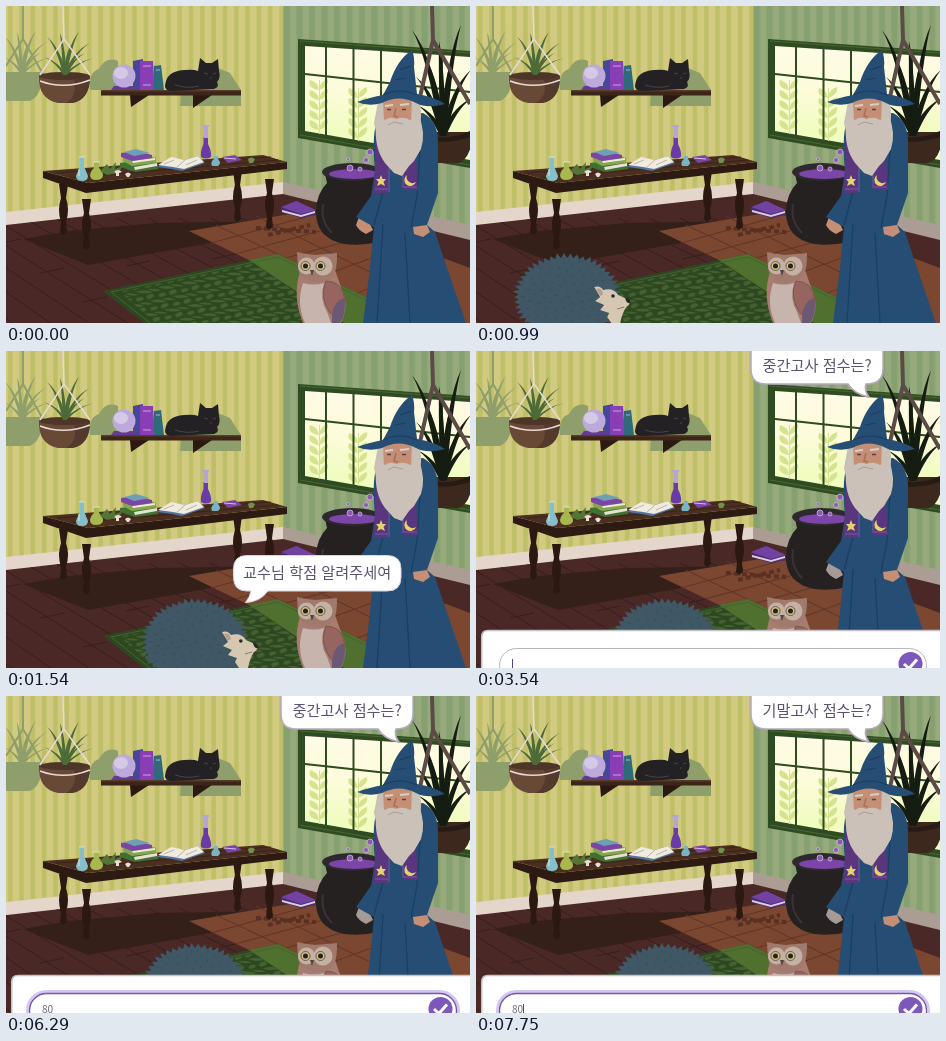
An HTML page for the animation above (8 s loop, 464 px wide and 317 px high).

```html
<!DOCTYPE html>
<html lang="ko">
<head>
<meta charset="utf-8">
<style>
  html, body { margin: 0; width: 100%; height: 100%; overflow: hidden; background: #4a2825; }
  svg { display: block; width: 464px; height: 317px; }
  text { font: 300 15.2px "Noto Sans CJK KR", "Noto Sans CJK", "Noto Sans", sans-serif; fill: #5c5270; }
  #typed { font-size: 10px; fill: #6c6877; }
</style>
</head>
<body>
<svg viewBox="0 0 464 317" fill="none">
  <defs>
    <pattern id="stripeL" width="11.300" height="9" patternUnits="userSpaceOnUse">
      <path fill="#d1ca80" d="M0 0H12V9H0z"/><path fill="#bfbf68" d="M2 0H6.500V9H2z"/>
    </pattern>
    <pattern id="stripeR" width="12.500" height="9" patternUnits="userSpaceOnUse" x="277">
      <path fill="#96aa7b" d="M0 0H13V9H0z"/><path fill="#87a072" d="M1 0H7V9H1z"/>
    </pattern>
    <pattern id="weave" width="15" height="13" patternUnits="userSpaceOnUse" patternTransform="matrix(1.500 -.3 1.100 .7 97 285)">
      <path fill="#456130" d="M1 6Q3 0 8 1Q8 5 1 6ZM1 8Q8 7 9 12Q3 13 1 8ZM9 6Q10 1 15 2Q15 6 9 6ZM9 8Q14 8 15 12Q10 12 9 8Z"/>
    </pattern>
    <linearGradient id="sky" x2="0" y2="1"><stop stop-color="#fffbe6"/><stop offset=".4" stop-color="#fdfbda"/><stop offset=".75" stop-color="#f0fcc0"/></linearGradient>
    <clipPath id="floorClip"><path d="M0 219L277 188L464 234V317H0Z"/></clipPath>
  </defs>

  <!-- walls and floor -->
  <path fill="url(#stripeL)" d="M0 0H277V190L0 220z"/>
  <path fill="url(#stripeR)" d="M277 0H464V235L277 189z"/>
  <path fill="#e5d6cb" d="M0 206L277 176V189L0 220Z"/>
  <path fill="#ab9d94" d="M277 176L464 219V236L277 189Z"/>
  <path fill="#4a2825" d="M0 219L277 188L464 234V317H0Z"/>
  <g clip-path="url(#floorClip)">
    <g id="planks" stroke="#391d1c"/>
    <path fill="#352019" d="M17 233L62 225L150 217L268 215L205 237L82 259Z"/>
    <path fill="#7c4731" d="M183 225L290 207L330 212L464 262V317H372L275 249L245 255Z"/>
    <path stroke="#5f3426" d="M205 237L300 211M229 248L325 222M280 252L350 233M313 271L385 245M345 290L410 262M210 219L280 252M250 210L372 270"/>
    <path stroke="#5a3022" stroke-width="4" stroke-dasharray="5 3" d="M250 222L310 226M262 229L304 219"/>
  </g>
  <path fill="#2d4820" d="M97 285L272 248L378 300V317H138Z"/>
  <path fill="#50702f" d="M243 254L272 248L378 300V317H338Z"/>
  <path fill="url(#weave)" d="M114 286L250 257L330 317H150Z"/>
  <path stroke="#456330" d="M105 286L272 251L372 300M105 286L144 317"/>

  <!-- wall shadows -->
  <g fill="#8f9f6c">
    <path d="M0 66H37Q36 90 24 95H0ZM84 84Q82 66 93 63Q100 50 112 55L113 84ZM175 84Q181 69 187 72L207 60L224 67L235 84V100H174Z"/>
    <g id="shadePlant"/>
  </g>
  <path stroke="#8f9f6c" stroke-width="2" d="M17 0V33L0 60M17 33L37 68"/>

  <!-- left hanging plant -->
  <path fill="#684936" d="M33 70Q32 93 52 97H66Q84 94 84 70Z"/>
  <ellipse cx="58.500" cy="70" rx="25.500" ry="4" fill="#4d3528"/>
  <path fill="#533a2c" d="M68 74Q72 90 60 97H66Q84 94 84 70Z"/>
  <g id="plantL" fill="#4c6b38"/>
  <path stroke="#e9d9d5" stroke-width="1.500" d="M57 0L58 33L34 69M58 33L84 69M34 75Q58 84 84 74"/>

  <!-- shelf -->
  <path fill="#2b1912" d="M124 89H143L125 101ZM187 89H206L187 102Z"/>
  <path fill="#3c2519" d="M95 85H235V89.500H95Z"/>
  <path fill="#5a3b27" d="M95 84H235V85.500H95Z"/>
  <path fill="#46479a" d="M127 55L137 53V84H127Z"/>
  <path fill="#8a3eb6" d="M134 55H147L149 84H134Z"/>
  <path fill="#2f6a78" d="M148 60L155 59L158 84H148Z"/>
  <path stroke="#c9a3dd" d="M137 60H145M137 79H145M150 64H154"/>
  <path fill="#633b91" d="M108 80H128L131 84H105Z"/>
  <circle cx="118" cy="70" r="11.500" fill="#bda9dc"/>
  <ellipse cx="115" cy="67" rx="7" ry="6" fill="#d5cae6"/>
  <path fill="#232124" d="M159 80Q160 65 178 64Q188 63 192 65L194 52L200 57H206L212 53L213 65Q215 72 211 76Q214 81 208 83L166 85Q159 85 159 80Z"/>
  <path stroke="#48434a" d="M169 79Q181 83 193 80M198 67L202 68M207 68L210 67M204 72H206"/>

  <!-- window -->
  <path fill="#2f4b22" d="M292 33L464 45V162L292 132Z"/>
  <path fill="url(#sky)" d="M299 40L464 51V154L299 125Z"/>
  <g id="vines" fill="#d5e28e"/>
  <path stroke="#2f4b22" stroke-width="2" d="M320 39V130M347.500 40V137M375 43V142M406 45V150M436 47V156M299 68L464 86"/>
  <path stroke="#49672f" stroke-width="1" d="M294 35L464 47M294 129L464 159"/>

  <!-- right hanging plant -->
  <path fill="#3d281d" d="M413 126Q414 153 430 157H452Q464 155 468 126Z"/>
  <path fill="#281a14" d="M413 126Q438 137 464 125V131Q438 140 413 132Z"/>
  <g id="plantR" fill="#151d12"/>
  <path stroke="#5c4a46" stroke-width="4" d="M426 0L427 34L406 126M427 34L464 98"/>

  <!-- table -->
  <g fill="#2a1811">
    <path id="leg" d="M53 178H62L60 192Q64 204 60 216L61 226L57 229L54 226L55 216Q51 204 55 192Z"/>
    <use href="#leg" x="174" y="-13"/><use href="#leg" x="206" y="-5"/><use href="#leg" x="23" y="15"/>
  </g>
  <path fill="#2d1a12" d="M37 165L82 177L281 156V163L80 187L37 172Z"/>
  <path fill="#4b2f20" d="M37 165L257 149L281 156L82 177Z"/>
  <path stroke="#3b2418" d="M50 167L265 151M64 172L272 154"/>
  <path fill="#84bfca" d="M74 151H78V160L82 170Q82 175 76 175Q70 175 70 170L74 160Z"/>
  <path fill="#a8b84f" d="M88 156H93V162Q97 165 97 170Q96 174 90 174Q84 174 84 169Q85 164 88 162Z"/>
  <path stroke="#d8e4d4" d="M73 151H79M87 156H94M73 163V170"/>
  <path fill="#557536" d="M94 165L101 158L104 163L110 156L109 163L117 160L112 167L101 169Z"/>
  <path fill="#e9dfd4" d="M108 166Q112 162 116 166L113 167V170H110V167ZM119 168Q122 165 125 168L123 171H121Z"/>
  <path fill="#3f7034" d="M114 157L141 153L152 158V163L129 166L114 161Z"/>
  <path fill="#e7e1cf" d="M128 161L151 157V160L129 164Z"/>
  <path fill="#86a64d" d="M117 151L140 148L150 152V157L126 160L117 155Z"/>
  <path fill="#efe8d9" d="M126 155L149 152V154L127 157Z"/>
  <path fill="#7b45a5" d="M115 147L131 145L146 149V152L126 155L115 151Z"/>
  <path fill="#6f9fb5" d="M118 146L130 143L144 147L128 150Z"/>
  <path fill="#5276a1" d="M151 161L166 152L179 154L192 150L199 157L176 165L166 163Z"/>
  <path fill="#f0eadf" d="M152 159L165 151L179 154L192 150L198 156L178 163L167 161Z"/>
  <path stroke="#b9b3aa" d="M158 158L168 154M180 159L191 154M171 161L179 154"/>
  <path fill="#6a3ba6" d="M197.500 131H202V138Q206 146 205 151Q200 154 195 151Q194 146 197.500 138Z"/>
  <path fill="#b6a4d4" d="M198 120H202V132H198ZM196 119H203V121H196Z"/>
  <path fill="#78b4c4" d="M208 150H212V153Q216 157 212 160H206Q204 156 208 153Z"/>
  <path fill="#7b45a5" d="M216 151L229 149L236 154L222 157Z"/><path stroke="#d6bfe2" d="M218 152L230 153"/>
  <path fill="#71904b" d="M242 153Q245 150 249 153L247 157H243Z"/>

  <!-- floor book and cauldron -->
  <path fill="#4b2b73" d="M275 202L292 195L310 206V209L295 212L275 206Z"/>
  <path fill="#d9cfdc" d="M276 204L295 209L309 205V207L295 211L276 206Z"/>
  <path fill="#7142a2" d="M275 201L290 195L310 204L295 208Z"/>
  <path fill="#252120" d="M319 168H372V236Q356 240 338 238Q309 232 310 204Q311 187 321 177Z"/>
  <path stroke="#393339" stroke-width="2" d="M317 198Q314 215 326 227"/>
  <ellipse cx="346" cy="166" rx="30" ry="9" fill="#2e292e"/>
  <ellipse cx="348" cy="168" rx="25" ry="5" fill="#7c46a8"/>
  <g fill="#8d59b5" stroke="#cbb5de" stroke-width=".8">
    <circle cx="344" cy="162" r="3"/><circle cx="360" cy="154" r="2.500"/><circle cx="342" cy="153" r="1.500"/><circle cx="364" cy="146" r="3"/><circle cx="354" cy="163" r="2"/>
  </g>

  <!-- wizard -->
  <path id="hand" d="M353 211L363 216L367 224L360 228Q352 224 350 219Z"/>
  <path fill="#264d73" d="M373 111Q365 124 369 165L365 190L350 211L368 221L363 270L357 317H460Q441 262 429 226L421 219L432 187V140Q433 115 417 107Z"/>
  <path fill="#c48f75" d="M407 221L421 219L424 226L417 231L408 228Z"/>
  <path stroke="#1b3d60" stroke-width="1.200" d="M368 219L377 186M405 222L411 190L414 144M377 218L371 317M399 227L404 317"/>
  <path fill="#5a367f" d="M370 130H383L382 187H368ZM397 137H409L412 184H398Z"/>
  <path stroke="#8057a5" d="M369 183H382M398 181H411M383 150V186M397 150V182"/>
  <path fill="#e5d36b" d="M375 169L376.500 173L380 173L377.500 176L379 180L375 178L371 180L372.500 176L370 173L373.500 173ZM401 169A6 6 0 1 0 410 176A6 6 0 0 1 401 169Z"/>
  <path fill="#c8bfb5" d="M373 90L368 117L372 134L413 125Q418 104 411 91Z"/>
  <path fill="#c48f75" d="M377 91H406L405 117H378Z"/>
  <path fill="#cbc1b8" d="M372 109L379 114Q384 110 390 113Q398 110 404 114L413 110Q420 127 415 143L408 155L403 160L396 170L388 167L379 157Q368 142 370 119Z"/>
  <path stroke="#d8cfc7" stroke-width="2" d="M379 100L387 99M394 99L403 98"/>
  <path stroke="#5b423e" stroke-width="1.500" d="M381 103.500H385M396 103.500H400"/>
  <path stroke="#a87058" stroke-width="1.500" d="M390 102L388 110L392 111"/>
  <path stroke="#a99d95" d="M382 119L388 116L397 118"/>
  <path fill="#264d73" d="M351 96Q362 92 377 89L384 76Q391 54 406 44Q409 52 408 61L411 88Q429 91 439 98Q421 103 410 97Q393 88 376 97Q363 101 351 96Z"/>
  <path stroke="#1b3d60" stroke-width="1.200" d="M377 89Q394 81 411 89M394 64L405 60M389 74L400 72"/>

  <!-- owl -->
  <path fill="#a87d70" d="M294 266Q286 290 297 317H335Q344 299 335 281L329 264Z"/>
  <path fill="#c6b4ad" d="M297 277Q308 280 318 277Q313 293 321 306L325 317H299Q290 297 297 277Z"/>
  <path fill="#96655f" stroke="#75504d" stroke-width=".8" d="M320 275Q337 275 339 295L336 310Q330 312 324 307Q313 291 320 275Z"/>
  <path fill="#6b5874" d="M338 292Q325 296 326 317H334Q341 308 338 292Z"/>
  <path fill="#a07a6d" d="M291 246Q299 248 309 249Q321 248 331 247Q331 257 330 262Q327 277 310 276Q294 275 292 262Z"/>
  <circle cx="300.500" cy="260" r="8.500" fill="#c5b0a4"/><circle cx="317" cy="260" r="9.500" fill="#c5b0a4"/>
  <g stroke="#51463b" stroke-width=".8" fill="#d0c283"><circle cx="299.500" cy="260" r="4.500"/><circle cx="314.500" cy="260" r="4.500"/></g>
  <path fill="#252025" d="M297 260A2.500 2.500 0 1 0 302 260A2.500 2.500 0 1 0 297 260ZM312 260A2.500 2.500 0 1 0 317 260A2.500 2.500 0 1 0 312 260Z"/>
  <path fill="#504744" d="M304 264H308L306 270Z"/>

  <!-- hedgehog, local x starts at its left edge -->
  <g id="hedgehog">
    <path id="spines" fill="#405865"/>
    <g id="quills" stroke="#374e5b"/>
    <path fill="#d6c7b3" d="M82 281Q88 279 91 284Q101 281 106 289L117 294Q119 298 114 301Q110 307 108 317H99L95 311L97 307L88 304L92 299L83 295L88 291Z"/>
    <path fill="#b79d8d" d="M84 283Q89 281 91 288L88 290Z"/>
    <path fill="#2b2729" d="M113 292Q119 292 118 297Q114 298 113 292ZM99 290A1.800 1.800 0 1 0 102.600 290A1.800 1.800 0 1 0 99 290Z"/>
    <path stroke="#8e7568" d="M105 303L112 301"/>
  </g>

  <g id="ask">
    <path fill="#fff" stroke="#d9d4dc" d="M241 204.500H381Q395 204.500 395 218V226Q395 240 381 240H262Q254 251 239.500 251.500Q244 246 245 240H241Q227.500 240 227.500 226V218Q227.500 204.500 241 204.500Z"/>
    <text x="237" y="227">교수님 학점 알려주세여</text>
  </g>

  <g id="quiz">
    <path fill="#fff" stroke="#b4a9bd" stroke-width="1.500" d="M275 -8V18Q275 33 290 33H372Q378 43 393 46Q388 40 390 33Q407 33 407 18V-8Z"/>
    <text id="question" x="286.500" y="20"></text>
    <path fill="#fff" stroke="#c6c0c9" stroke-width="1.500" d="M5.700 325V286Q5.700 279.500 12 279.500H472V325Z"/>
    <rect x="23.500" y="297.500" width="427" height="34" rx="17" fill="#fff" stroke="#b9b7c0"/>
    <g id="ring">
      <rect x="21.500" y="295.500" width="431" height="38" rx="19" stroke="#d3c7ef" stroke-width="3"/>
      <rect x="23.500" y="297.500" width="427" height="34" rx="17" stroke="#7657ad" stroke-width="1.300"/>
    </g>
    <circle cx="434.500" cy="313" r="12" fill="#7d58bb"/>
    <path stroke="#fff" stroke-width="3" d="M428 313L433 317.500L441 308.500"/>
    <text id="typed" x="36" y="317"></text>
    <path id="caret" stroke="#593f96" d="M.5 308V318"/>
  </g>
</svg>
<script>
const LOOP = 8000;
const $ = id => document.getElementById(id);
const clamp = v => Math.max(0, Math.min(1, v));
const path = (id, d) => $(id).insertAdjacentHTML("beforeend", `<path d="${d}"/>`);

// Tapered blades fanning out from a common root
function fan(id, x, y, tips, w) {
  for (const [dx, dy] of tips) {
    const mx = x + dx * .4, my = y + dy * .75;
    path(id, `M${x - w} ${y}Q${mx - w} ${my} ${x + dx} ${y + dy}Q${mx + w} ${my} ${x + w} ${y}Z`);
  }
}
const leaves = [[-21, -18], [-18, -38], [-11, -27], [-5, -42], [6, -30], [14, -43], [20, -22], [29, -17], [25, -32]];
fan("plantL", 59, 69, leaves, 1.7);
fan("shadePlant", 16, 68, leaves, 1.7);
fan("plantR", 437, 130, [[-31, -106], [-27, -59], [-18, -78], [-4, -95], [8, -74], [18, -111], [28, -66], [29, -38], [-26, -31]], 3);

// Leafy stems behind the glass
for (const [x, top, base] of [[313, 74, 128], [352, 82, 135]]) {
  path("vines", `M${x} ${top}H${x + 1}V${base}H${x}Z`);
  for (let y = top + 5; y < base; y += 10)
    path("vines", `M${x} ${y + 5}Q${x - 12} ${y + 3} ${x - 9} ${y - 5}Q${x - 1} ${y - 3} ${x} ${y + 5}Q${x + 11} ${y + 1} ${x + 9} ${y - 6}Q${x + 1} ${y - 4} ${x} ${y + 5}Z`);
}

for (let i = 0; i < 17; i++) path("planks", `M${i * 31 - 230} 212L${i * 39 - 100} 325`);
for (let i = 0; i < 8; i++) path("planks", `M${i * 43 - 9} ${238 + i * 29 % 65}l24 -5`);

const spike = (a, r) => [55 + Math.cos(a) * 52 * r, 291 + Math.sin(a) * 42 * r].map(v => v.toFixed(1)).join(" ");
let outline = "";
for (let i = 0; i < 100; i++) outline += (i ? "L" : "M") + spike(i * Math.PI / 50, i % 2 ? .93 : 1.02 + i * 7 % 5 * .01);
$("spines").setAttribute("d", outline + "Z");
for (let i = 0; i < 80; i++) {
  const a = i * 2.4, r = Math.sqrt(i / 80) * .86;
  path("quills", `M${spike(a, r)}L${spike(a, r + .07)}`);
}

const walk = [[500, -119], [990, 36], [1260, 91], [1540, 134]];
function walkX(t) {
  for (let i = 1; i < walk.length; i++) {
    const [t0, x0] = walk[i - 1], [t1, x1] = walk[i];
    if (t < t1) return x0 + (x1 - x0) * clamp((t - t0) / (t1 - t0));
  }
  return walk[3][1];
}

const within = (t, spans) => spans.some(([a, b]) => t >= a && t < b);
const show = (id, on) => $(id).style.display = on ? "" : "none";

function draw(now) {
  const t = now % LOOP, quiz = t >= 3540, second = t >= 6490;
  $("hedgehog").setAttribute("transform", `translate(${walkX(t).toFixed(2)})`);
  $("hand").setAttribute("fill", quiz ? "#a69a96" : "#c48f75");
  show("ask", t >= 1540 && !quiz);
  show("quiz", quiz);
  $("question").textContent = second ? "기말고사 점수는?" : "중간고사 점수는?";
  $("ring").setAttribute("opacity", clamp((t - (second ? 6490 : 3540)) / 270));
  const [one, two] = second ? [7480, 7680] : [5690, 5760];
  const count = (t >= one) + (t >= two);
  $("typed").textContent = "80".slice(0, count);
  $("caret").setAttribute("transform", `translate(${36 + count * 5.5})`);
  show("caret", within(t, [[3540, 4080], [4610, 5160], [5690, 6290], [6490, 7020], [7480, LOOP]]));
}

const start = performance.now();
function tick() {
  draw(performance.now() - start);
  requestAnimationFrame(tick);
}
tick();
</script>
</body>
</html>
```
